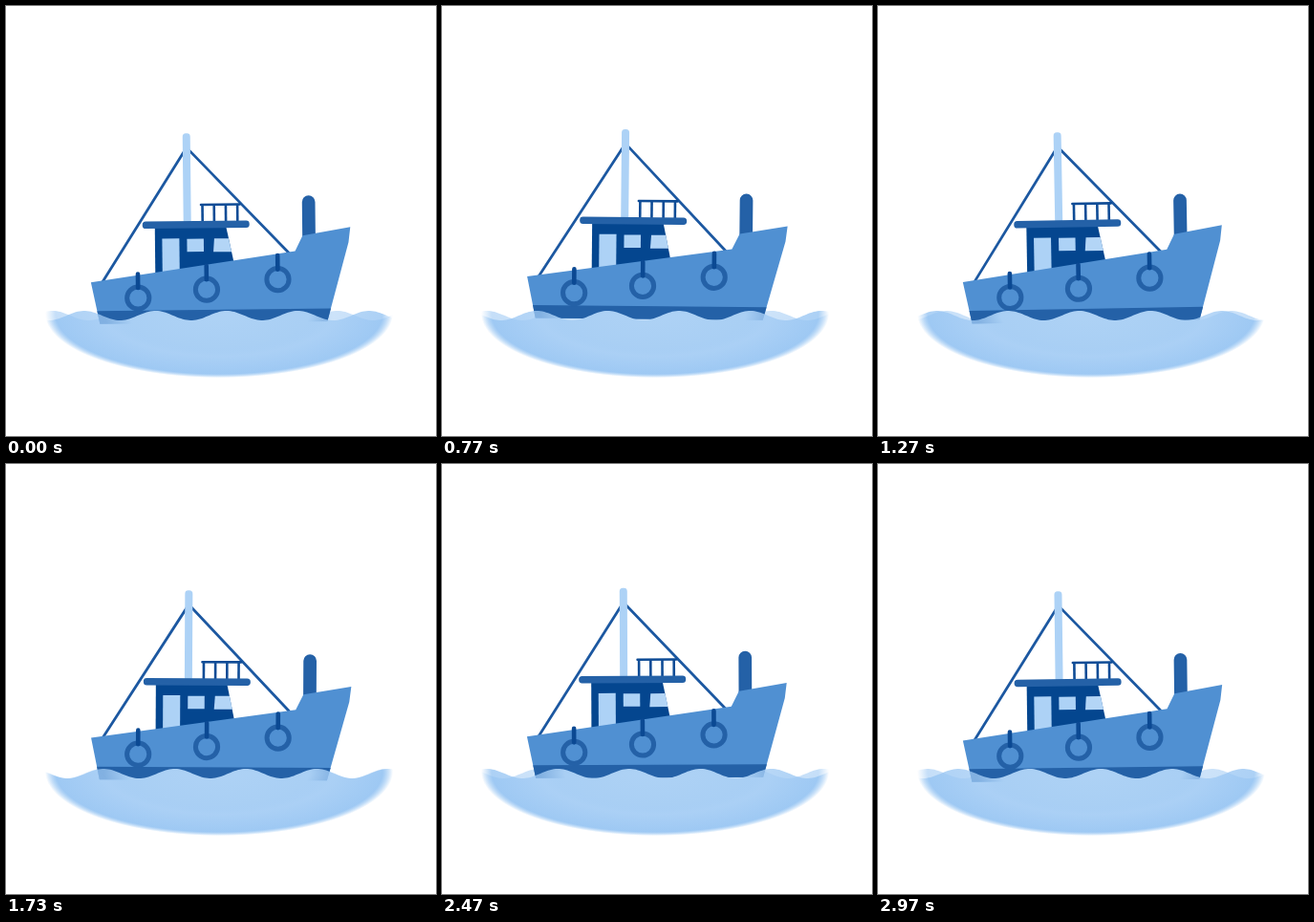
An HTML page with a canvas that plays this animation: 450x450 px, repeating every 3000 ms.

```html
<!DOCTYPE html>
<html lang="en">
<head>
<meta charset="utf-8">
<title>Boat</title>
<style>
  html, body { margin: 0; width: 100%; height: 100%; overflow: hidden; background: #fff; }
  canvas { display: block; width: 450px; height: 450px; }
</style>
</head>
<body>
<canvas id="stage" width="450" height="450"></canvas>
<script>
const canvas = document.getElementById('stage');
const ctx = canvas.getContext('2d');
const ratio = window.devicePixelRatio || 1;
canvas.width = canvas.height = 450 * ratio;

const LOOP = 3000, SWING = LOOP / 2, TAU = Math.PI * 2;
const NAVY = '#04468f', DEEP = '#2461a7', HULL = '#5090d2', PALE = '#add2f6';
const SEA = { x: 223, y: 322, rx: 182, ry: 67 };
const WAVE = 74.5;
const PIVOT = { x: 225, y: 298 };

const swing = (t, peak) => Math.cos((t - peak) / SWING * TAU);

function trace(pts) {
  ctx.beginPath();
  pts.forEach(([x, y]) => ctx.lineTo(x, y));
}

function poly(color, ...pts) {
  trace(pts);
  ctx.fillStyle = color;
  ctx.fill();
}

function line(color, width, cap, ...pts) {
  trace(pts);
  ctx.strokeStyle = color;
  ctx.lineWidth = width;
  ctx.lineCap = cap;
  ctx.stroke();
}

function box(color, x, y, w, h, r = 0) {
  ctx.fillStyle = color;
  ctx.beginPath();
  ctx.roundRect(x, y, w, h, r);
  ctx.fill();
}

// Wavy top edge closed by a bowl; solid in the middle, thinner and soft at the rim.
function water(crest, alpha) {
  const { x, y, rx, ry } = SEA;
  ctx.save();
  ctx.globalAlpha = alpha;
  ctx.beginPath();
  for (let px = x - rx; px <= x + rx; px += 2) {
    ctx.lineTo(px, 324 - 5 * Math.cos((px - crest) / WAVE * TAU));
  }
  ctx.lineTo(x + rx, y + ry);
  ctx.lineTo(x - rx, y + ry);
  ctx.closePath();
  ctx.clip();
  ctx.translate(x, y);
  ctx.scale(rx, ry);
  const g = ctx.createRadialGradient(0, 0, 0, 0, 0, 1);
  g.addColorStop(0, 'rgba(174,210,245,1)');
  g.addColorStop(0.52, 'rgba(169,207,244,1)');
  g.addColorStop(0.66, 'rgba(160,202,244,.76)');
  g.addColorStop(0.94, 'rgba(146,194,242,.76)');
  g.addColorStop(1, 'rgba(150,197,243,0)');
  ctx.fillStyle = g;
  ctx.fillRect(-1, -1, 2, 2);
  ctx.restore();
}

function buoy(x, y) {
  ctx.strokeStyle = DEEP;
  ctx.lineWidth = 5;
  ctx.beginPath();
  ctx.arc(x, y, 11.6, 0, TAU);
  ctx.stroke();
  line('#0b4993', 4.6, 'round', [x, y - 25], [x, y - 10.5]);
}

function boat() {
  // rigging and mast
  line('#1c58a1', 2.8, 'butt', [101, 286], [190.5, 146], [299, 260]);
  box(PALE, 186.5, 131, 8, 95, 3.5);

  // railing
  line('#0f4c96', 2.6, 'round', [205, 206], [245.5, 206]);
  for (let i = 0; i < 4; i++) {
    const x = 206.5 + i * 12.2;
    line('#0f4c96', 2.6, 'butt', [x, 206], [x, 224]);
  }

  // cabin
  poly(NAVY, [156.5, 229], [231, 229], [239.5, 270], [156.5, 282]);
  box(PALE, 164, 241, 18, 40);
  box(PALE, 190, 241.5, 17.5, 13.5);
  poly('#b3d5f6', [218.5, 241.5], [233.6, 241.5], [236.6, 255.5], [217.5, 255.5]);
  box(DEEP, 143.5, 223, 112, 7.5, 3.5);

  // funnel
  box(DEEP, 310.8, 197.5, 13.7, 48, [6.8, 6.8, 0, 0]);

  // hull
  poly(HULL, [89, 286], [303, 255.5], [311, 239.5], [361, 231], [359, 247], [336, 329.5], [98, 329.5]);
  poly(DEEP, [95.2, 316], [339.8, 316], [336, 329.5], [98, 329.5]);
  buoy(138.2, 302.8);
  buoy(210, 294.8);
  buoy(284.6, 285);
}

function draw(t) {
  ctx.setTransform(ratio, 0, 0, ratio, 0, 0);
  ctx.fillStyle = '#fff';
  ctx.fillRect(0, 0, 450, 450);

  // both waves run left, the far one four lengths per loop, the near one three
  const drift = t / LOOP * WAVE;
  water(49 - 4 * drift, 0.7);

  ctx.save();
  ctx.translate(PIVOT.x, PIVOT.y + 1.8 * swing(t, 50));
  ctx.rotate(swing(t, 535) * Math.PI / 180);
  ctx.translate(-PIVOT.x, -PIVOT.y);
  boat();
  ctx.restore();

  water(82 - 3 * drift, 1);
}

const start = performance.now();
function tick() {
  draw((performance.now() - start) % LOOP);
  requestAnimationFrame(tick);
}
tick();
</script>
</body>
</html>
```
